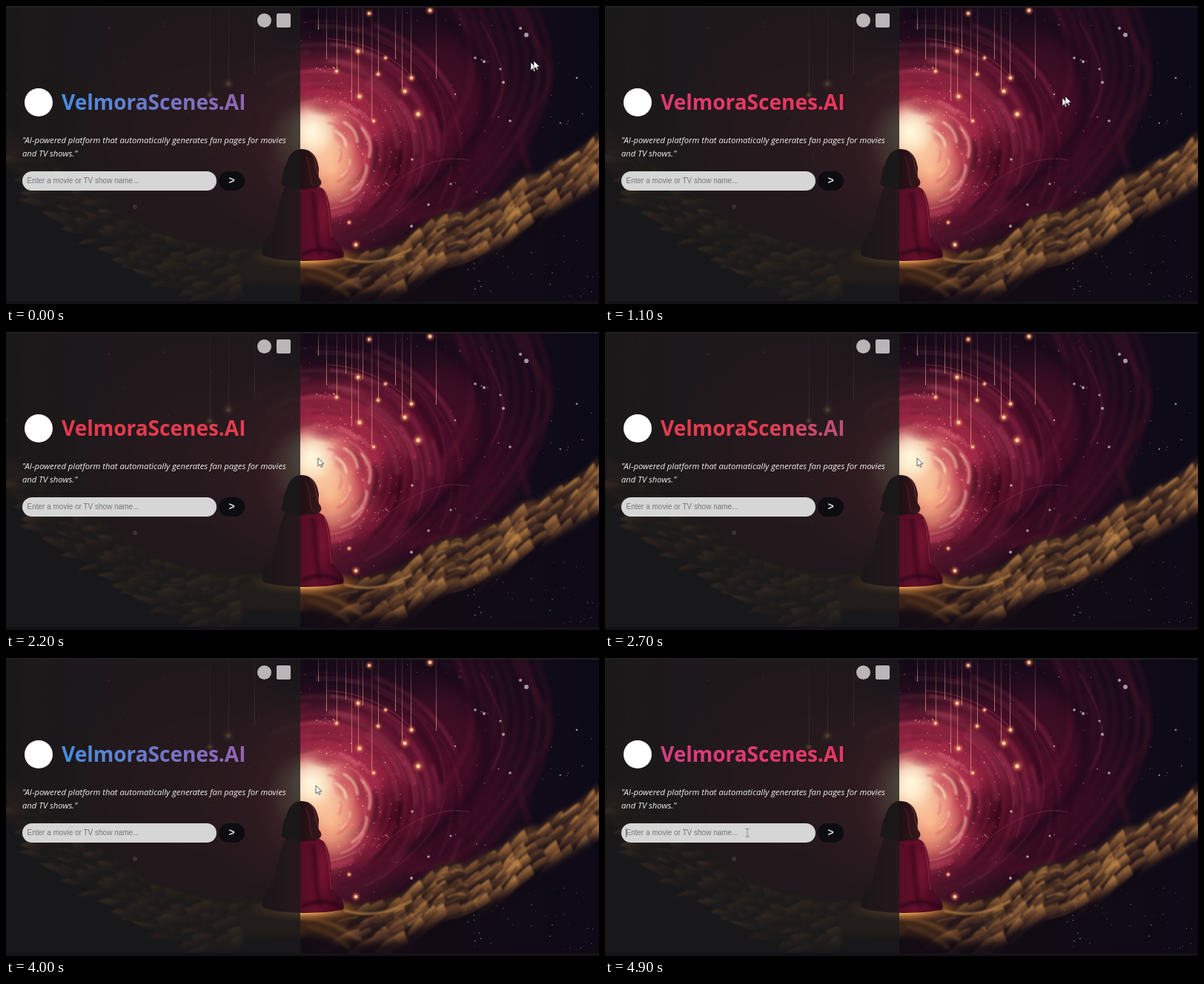
These frames come from a looping animation (800x402 px, 5 s). An HTML page with a canvas:

```html
<!DOCTYPE html>
<html lang="en">
<head>
<meta charset="utf-8">
<title>VelmoraScenes.AI</title>
<style>
html, body { margin: 0; width: 100%; height: 100%; overflow: hidden; background: #141216; }
#stage { position: relative; width: 800px; height: 402px; overflow: hidden; }
#stage > * { position: absolute; margin: 0; }
#art { left: 0; top: 0; }
#panel { left: 0; top: 2px; width: 397px; height: 396px; background: rgba(27, 27, 27, .8); }
.icon { top: 10px; width: 19px; height: 19px; background: #bab6b7; }
#mark { left: 24.5px; top: 111px; width: 38px; height: 38px; border-radius: 50%; background: #fff; }
h1 {
  left: 75px; top: 110px; width: 249px; white-space: nowrap;
  font: 700 28px "Open Sans", sans-serif; color: transparent;
  background: linear-gradient(to right, #458fe0, #9563b4 14.3%, #dc3b7c 28.6%, #ea3660 42.9%,
    #e8384f 57.1%, #e23d50 71.4%, #8b68b4 85.7%, #458fe0) 0 0 / 1736px 100% repeat-x;
  -webkit-background-clip: text; background-clip: text;
  animation: hue 5s infinite;
}
#tag {
  left: 22px; top: 172px; white-space: nowrap; color: #f1eeee;
  font: italic 11.28px/17.6px "Open Sans", sans-serif;
}
#field {
  left: 22px; top: 222.5px; width: 261.5px; height: 26px; border-radius: 13px; box-sizing: border-box;
  padding-left: 6.5px; background: #d6d6d6;
  font: 10px/26px "Liberation Sans", Arial, sans-serif; color: #757575;
}
#go {
  left: 287px; top: 222.5px; width: 35px; height: 26px; border-radius: 13px; background: #0d0c11;
  font: 700 14px/25px "Liberation Sans", Arial, sans-serif; color: #e0dede; text-align: center;
}
#caret { left: 28px; top: 230px; width: 1px; height: 12px; background: #666; animation: focus 5s step-end infinite; }
#pointer { left: 0; top: 0; width: 16px; height: 16px; overflow: visible; animation: move 5s infinite; }
#arrow { fill: #fff; stroke: #252025; stroke-width: .7; animation: arrow 5s step-end infinite; }
#ghost { animation: ghost 5s step-end infinite; }
#beam { fill: none; stroke: #888; animation: beam 5s step-end infinite; }

@keyframes hue {
  0% { background-position: 0 0; animation-timing-function: steps(4); }
  8% { background-position: -198px 0; animation-timing-function: steps(7); }
  22% { background-position: -570px 0; animation-timing-function: steps(11); }
  44% { background-position: -967px 0; animation-timing-function: steps(10); }
  64% { background-position: -1240px 0; animation-timing-function: steps(8); }
  80% { background-position: -1736px 0; animation-timing-function: steps(10); }
  100% { background-position: -2252px 0; }
}
@keyframes move {
  0% { transform: translate(708px, 76px); animation-timing-function: steps(4); }
  8% { transform: translate(634px, 115px); animation-timing-function: steps(7); }
  22% { transform: translate(617px, 124px); animation-timing-function: steps(11); }
  44%, 64% { transform: translate(421px, 170px); animation-timing-function: steps(8); }
  80% { transform: translate(418px, 172px); animation-timing-function: steps(9); }
  98%, 100% { transform: translate(192px, 236px); }
}
@keyframes arrow { 0% { opacity: 1; } 94%, 100% { opacity: 0; } }
@keyframes beam { 0% { opacity: 0; } 94%, 100% { opacity: 1; } }
@keyframes focus { 0% { opacity: 0; } 98%, 100% { opacity: 1; } }
@keyframes ghost { 0%, 22% { opacity: 1; } 2%, 24%, 100% { opacity: 0; } }
</style>
</head>
<body>
<div id="stage">
  <canvas id="art" width="800" height="402"></canvas>
  <div id="panel"></div>
  <div class="icon" style="left:338.5px;border-radius:50%"></div>
  <div class="icon" style="left:365px;border-radius:2px"></div>
  <div id="mark"></div>
  <h1>VelmoraScenes.AI</h1>
  <p id="tag">"AI-powered platform that automatically generates fan pages for movies<br>and TV shows."</p>
  <div id="field">Enter a movie or TV show name...</div>
  <div id="go">&gt;</div>
  <div id="caret"></div>
  <svg id="pointer">
    <g id="arrow">
      <path d="M0 0V11L2.6 8.6 4.3 12.4 6 11.6 4.4 8H8Z"/>
      <path id="ghost" d="M4 -2V9L6.6 6.6 8.3 10.4 10 9.6 8.4 6H12Z"/>
    </g>
    <path id="beam" d="M-2.5 -5.5H2.5M0 -5.5V5M-2.5 5H2.5"/>
  </svg>
</div>
<script>
const c = document.getElementById('art').getContext('2d');
let seed = 41;
const rnd = () => (seed = (seed * 16807) % 2147483647) / 2147483647;
const range = (a, b) => a + rnd() * (b - a);
const pick = list => list[Math.floor(rnd() * list.length)];

function glow(x, y, rx, ry, stops) {
  c.save();
  c.translate(x, y);
  c.scale(rx, ry);
  const g = c.createRadialGradient(0, 0, 0, 0, 0, 1);
  stops.forEach(([at, color]) => g.addColorStop(at, color));
  c.fillStyle = g;
  c.fillRect(-1, -1, 2, 2);
  c.restore();
}
// Soft patch of one rgb colour
const haze = (x, y, rx, ry, rgb, a) =>
  glow(x, y, rx, ry, [[0, `rgba(${rgb},${a})`], [.5, `rgba(${rgb},${a * .6})`], [1, `rgba(${rgb},0)`]]);

function dot(x, y, r, color, alpha = 1) {
  c.globalAlpha = alpha;
  c.fillStyle = color;
  c.beginPath();
  c.arc(x, y, r, 0, 7);
  c.fill();
  c.globalAlpha = 1;
}

function stroke(d, color, width, alpha = 1, blur = 0) {
  c.save();
  c.lineCap = 'round';
  c.filter = blur ? `blur(${blur}px)` : 'none';
  c.globalAlpha = alpha;
  c.strokeStyle = color;
  c.lineWidth = width;
  c.stroke(new Path2D(d));
  c.restore();
}

function shape(d, fill, blur = 0, alpha = 1) {
  c.save();
  c.filter = blur ? `blur(${blur}px)` : 'none';
  c.globalAlpha = alpha;
  c.fillStyle = fill;
  c.fill(new Path2D(d));
  c.restore();
}

function fade(x0, y0, x1, y1, ...colors) {
  const g = c.createLinearGradient(x0, y0, x1, y1);
  colors.forEach((color, i) => g.addColorStop(i / (colors.length - 1), color));
  return g;
}

function sky() {
  c.fillStyle = fade(0, 0, 800, 0, '#191219', '#33101f', '#330d20', '#190c1b', '#0c0a18');
  c.fillRect(0, 0, 800, 402);
  haze(570, 150, 150, 170, '96,14,44', .75);
  haze(270, 170, 190, 160, '110,26,48', .7);
  haze(425, 190, 165, 165, '158,34,66', 1);
  haze(440, 170, 105, 125, '190,52,82', .8);
  haze(415, 5, 80, 85, '18,10,24', 1);
  haze(530, 10, 110, 60, '20,10,26', .8);
  haze(525, 215, 40, 60, '48,4,20', .7);
}

function swirl() {
  for (let i = 0; i < 110; i++) {
    const r = range(58, 205), a = range(-2.4, 1.1);
    c.save();
    c.filter = `blur(${range(.5, 2.5)}px)`;
    c.globalAlpha = range(.15, .5) * (1 - r / 330);
    c.strokeStyle = pick(['#d2486a', '#8f1d42', '#1e0817', '#1e0817', '#e8808c', '#3a0a20']);
    c.lineWidth = range(1, 8);
    c.beginPath();
    c.ellipse(424, 196, r, r * .92, range(-.2, .2), a, a + range(.25, .9));
    c.stroke();
    c.restore();
  }
  for (let i = 0; i < 8; i++) {
    const x = 606 + i * 15;
    stroke(`M${x} -5C${x + 30} 60 ${x + 38} 120 ${x - 25} ${185 + i * 3}S${x - 90} 265 ${x - 150} 290`,
      i % 3 ? '#4a1028' : '#65182f', range(3, 9), .45, 3);
  }
  stroke('M552 5C615 22 645 65 648 120S612 212 548 258', '#150916', 15, .55, 5);
  stroke('M690 0C705 50 755 75 720 130S690 175 705 218', '#4a1428', 6, .6, 3);
  stroke('M640 20C668 70 684 105 655 150', '#7e2c44', 1.3, .6, .8);
  stroke('M500 45C560 70 590 110 592 170S552 262 506 298', '#8f2b4c', 1.3, .5, 1);
  stroke('M510 250C550 215 590 200 625 208', '#9c3a5a', 1, .45, .5);
}

function core() {
  haze(424, 205, 78, 92, '240,120,110', .85);
  haze(440, 222, 42, 52, '252,190,140', .9);
  haze(414, 178, 62, 58, '255,225,180', 1);
  haze(412, 168, 34, 36, '255,248,222', 1);
  haze(455, 168, 16, 26, '190,56,74', .5);
  haze(432, 136, 28, 13, '150,34,62', .55);
  for (let i = 0; i < 16; i++) {
    const r = range(25, 70), a = range(-1.3, .9);
    const at = (k, s) => `${422 + Math.cos(a + k) * s} ${200 + Math.sin(a + k) * s}`;
    stroke(`M${at(0, r)}Q${at(.3, r * 1.12)} ${at(.6, r)}`, pick(['#ffe6bd', '#d9576b', '#f7b58d']), range(1, 4), .5, 1.2);
  }
  for (let i = 0; i < 120; i++) {
    const a = range(-1.6, 1.3), r = range(40, 115);
    dot(422 + Math.cos(a) * r, 195 + Math.sin(a) * r, range(.3, 1.2), pick(['#ffd9b8', '#f59aa5', '#e8637f']), range(.3, .7));
  }
}

function lights() {
  [[275, 120], [300, 105], [335, 90], [421, 30], [432, 70], [446, 86], [458, 54], [466, 126], [475, 122],
   [481, 62], [493, 152], [502, 90], [525, 70], [534, 112], [546, 95], [580, 96]].forEach(([x, y]) => {
    c.fillStyle = fade(0, 0, 0, y, 'rgba(220,150,130,.12)', 'rgba(239,186,145,.65)');
    c.fillRect(x, 2, 1, y);
  });
  [[475, 61, 7], [490, 10, 6], [572, 6, 7], [538, 115, 8], [477, 122, 8], [556, 146, 9], [547, 97, 7], [496, 155, 6],
   [512, 70, 5], [446, 88, 6], [502, 92, 6], [472, 322, 7], [463, 292, 5], [300, 105, 9], [275, 120, 7]].forEach(([x, y, r]) => {
    glow(x, y, r, r, [[0, '#fff3cf'], [.22, '#f8c28a'], [.45, 'rgba(231,125,90,.5)'], [1, 'rgba(200,60,70,0)']]);
  });
}

function stars() {
  for (let i = 0; i < 210; i++) {
    dot(range(0, 800), range(4, 396), range(.3, 1), pick(['#fff', '#e9c9d4', '#c9a0b0']), range(.2, .7));
  }
  [[702, 39, 3], [694, 30, 2], [671, 103, 2], [667, 85, 1.6], [645, 75, 2], [680, 155, 1.8],
   [570, 268, 1.8], [547, 297, 2], [548, 207, 1.8], [633, 70, 1.8], [606, 119, 1.2], [724, 270, 1.8],
   [735, 333, 1.6], [600, 240, 1.5], [770, 97, 1.3], [174, 271, 3]].forEach(([x, y, r]) => dot(x, y, r, '#d8c6ca', .75));
}

const ridgePts = [[0, 165], [60, 210], [130, 258], [190, 297], [240, 316], [300, 326], [345, 325], [400, 327],
  [450, 336], [500, 328], [530, 319], [555, 301], [582, 281], [605, 276], [622, 279], [645, 263], [668, 257],
  [688, 237], [706, 226], [720, 228], [738, 211], [758, 203], [780, 188], [801, 167], [900, 130]];

function ridge(x) {
  const i = Math.max(1, ridgePts.findIndex(p => p[0] >= x));
  const [x0, y0] = ridgePts[i - 1], [x1, y1] = ridgePts[i];
  return y0 + (y1 - y0) * (x - x0) / (x1 - x0);
}
const depth = x => x > 600 ? 80 - (x - 600) * .15 : 62 + Math.max(0, x - 450) * .12;

// A fold of rock that runs down and left from the ridge
function lobe(x, len, drop, wide) {
  const y = ridge(x) + drop, tx = x - len, ty = ridge(Math.max(0, tx)) + drop + range(20, 38);
  const mid = x - len * .45, my = ridge(Math.max(0, mid)) + drop;
  shape(`M${x} ${y}Q${mid} ${my} ${tx} ${ty}Q${mid + 4} ${my + wide * 1.5} ${x + 6} ${y + wide}Z`,
    fade(mid, my - 2, mid + 8, my + wide * 1.3, pick(['#bd8447', '#a87240', '#8d5d36']), '#64412a', '#20141a'), 1, .85);
}

function ground() {
  let top = '', low = '';
  for (let x = 0; x <= 800; x += 8) {
    top += `L${x} ${ridge(x)}`;
    low = `L${x} ${ridge(x) + depth(x) * .8}` + low;
  }
  shape('M0 402' + top + 'L800 402Z', '#110b14', 1);
  shape('M0 165' + top + low + 'Z', fade(400, 0, 800, 0, '#402619', '#37221c', '#4a3024', '#3a251f'), 3);
  for (let drop = 0; drop < 50; drop += 16) {
    for (let x = 815; x > 40; x -= range(12, 24)) {
      if (x > 475 || x < 330) lobe(x, range(28, 55), drop + range(0, 6), range(9, 17));
    }
  }
  for (let i = 0; i < 90; i++) {
    const x = range(470, 815), d = rnd(), end = x - range(10, 26);
    const y0 = ridge(x) + 2 + d * depth(x) * .7, y1 = ridge(end) + 5 + d * depth(end) * .7;
    stroke(`M${x} ${y0}Q${(x + end) / 2} ${y1 - 6} ${end} ${y1}`, pick(['#c48d4d', '#1b1119', '#2a1919']), range(1, 3.5), .4, .8);
  }
  shape('M400 402V368C480 394 560 392 620 358S720 290 800 236V402Z', fade(500, 0, 800, 0, '#140c13', '#0e0a17'), 7);
  for (let i = 0; i < 45; i++) dot(range(610, 798), range(310, 395), range(.3, .9), '#d8c3cf', range(.25, .7));
  glow(400, 338, 85, 19, [[0, '#ffdc8d'], [.35, 'rgba(235,170,84,.95)'], [.7, 'rgba(154,91,44,.6)'], [1, 'rgba(80,45,30,0)']]);
  stroke('M400 350C425 352 447 360 478 380', '#8f5d31', 4, .6, 2);
  stroke('M408 362C430 367 445 376 462 390', '#5e3c22', 5, .5, 2);
  stroke('M458 341C490 349 515 345 546 328', '#c18a48', 3, .7, 1);
}

function person() {
  shape('M377 243C368 258 366 285 360 302C347 317 343 328 346 336C364 346 432 346 455 339C459 329 447 321 440 311C438 288 439 260 428 247C414 237 390 236 377 243Z',
    fade(350, 0, 456, 0, '#1d0811', '#4a0c20', '#650f2b', '#3a081b'), .5);
  haze(428, 285, 12, 40, '140,24,54', .55);
  stroke('M430 252C437 270 436 295 439 312', '#a83044', 1.2, .7, .5);
  stroke('M414 254C420 280 416 310 424 334', '#2c0717', 6, .6, 2);
  stroke('M400 335C420 325 439 328 452 337', '#26071a', 5, .65, 1.5);
  shape('M399 193C386 193 381 203 378 214C372 222 374 232 371 240C376 246 384 241 390 246C398 250 408 244 417 247C423 244 428 240 424 234C419 229 424 222 421 214C419 202 411 193 399 193Z',
    fade(376, 0, 427, 0, '#150a10', '#221015', '#3c171c'), .5);
  stroke('M410 197C420 205 416 216 421 226', '#8f4c36', 1, .65, .5);
  stroke('M405 204C413 218 407 231 414 242', '#5c2826', 1.5, .6, .6);
}

sky();
swirl();
core();
stars();
lights();
ground();
person();
c.fillStyle = '#222023';
c.fillRect(0, 0, 800, 2);
c.fillStyle = '#141216';
c.fillRect(0, 398, 800, 4);
</script>
</body>
</html>
```
